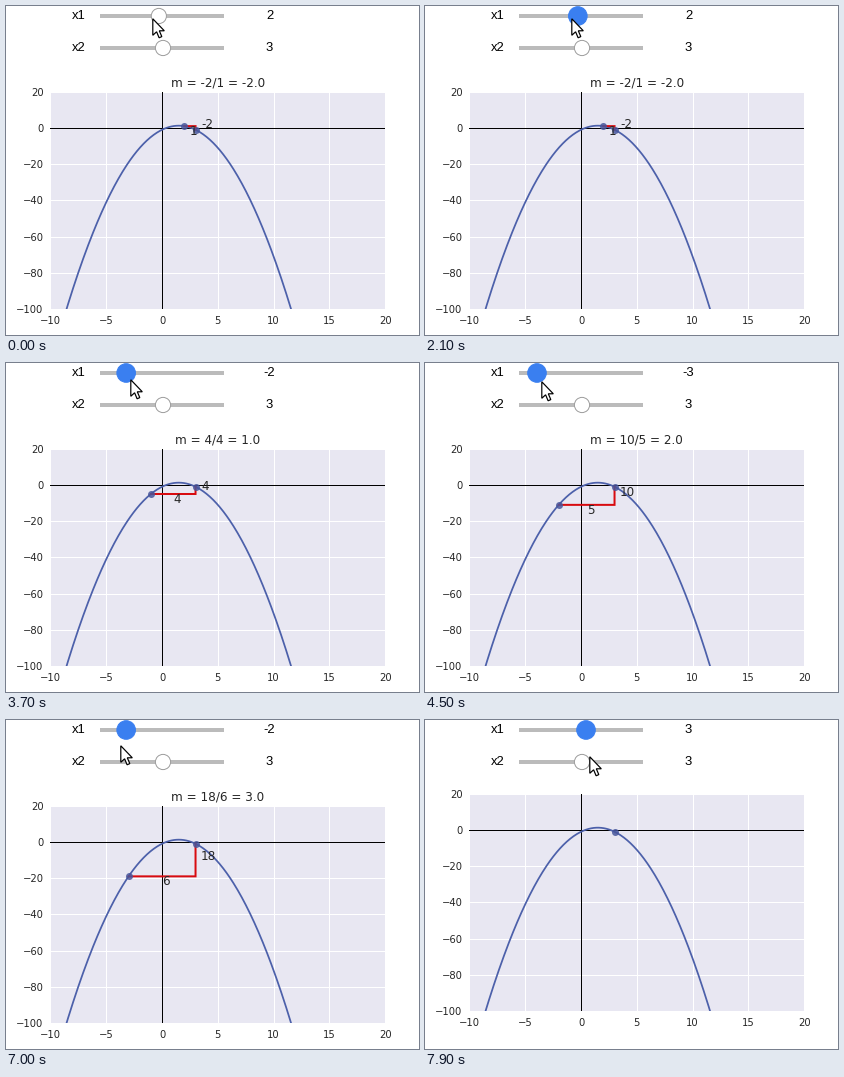
These frames come from a looping animation (413 px wide and 329 px high, 8000 ms). A matplotlib script:

```python
import numpy as np
import matplotlib.pyplot as plt
from matplotlib.animation import FuncAnimation
from matplotlib.patches import Circle, Polygon

W, H = 413, 329
TICKS = 80          # one tick is 100 ms
PRESS = 21
LAG = 2             # the graph redraws this many ticks after the slider
X2 = 3
INK = "#262626"
BLUE = "#4c60aa"
ACTIVE = "#3a7ff0"

plt.rcParams["font.family"] = "DejaVu Sans"
plt.rcParams["text.color"] = INK

# Key points: (tick, dragged value) and (tick, x, y) of the pointer tip
DRAG = [(21, 2), (23, .1), (28, -.6), (44, -2.55), (55, -3.55), (67, -3.9),
        (77, 2.6)]
POINTER = [(2, 146, 12), (4, 150, 3), (9, 121, 14), (11, 121, 14),
           (13, 146, 12), (21, 146, 12), (23, 134, 14), (31, 130, 15),
           (45, 116, 18), (58, 107, 22), (67, 107, 22), (70, 114, 25),
           (79, 164, 36)]
ARROW = np.array([(0, 0), (0, 16.5), (3.8, 13), (6.3, 19), (9, 17.8),
                  (6.5, 12), (11.5, 12)])


def f(x):
    return -x**2 + 3 * x - 1


def along(keys, tick):
    t, *tracks = zip(*keys)
    return [np.interp(tick, t, track) for track in tracks]


def slider_value(tick):
    return int(round(along(DRAG, tick)[0]))


# 72 dpi makes a point equal to a pixel
fig = plt.figure(figsize=((W + .01) / 72, (H + .01) / 72), dpi=72,
                 facecolor="white")

# Graph
ax = fig.add_axes([0, 0, 1, 1], facecolor="#e8e7f2")
ax.set(xlim=(-10, 20), ylim=(-100, 20))
ax.set_xticks(range(-10, 21, 5))
ax.set_yticks(range(-100, 21, 20))
ax.set_axisbelow(True)
ax.grid(color="white", lw=1)
ax.tick_params(length=0, pad=7, labelsize=10, labelcolor=INK)
ax.spines[:].set_visible(False)
ax.axhline(0, color="black", lw=1)
ax.axvline(0, color="black", lw=1)
xs = np.linspace(-10, 20, 400)
ax.plot(xs, f(xs), color=BLUE, lw=1.75)
legs, = ax.plot([], [], color="#d80b10", lw=2, solid_joinstyle="miter",
                snap=False)
dots = ax.scatter([], [], s=49, color="#47569c", alpha=.85, lw=0, zorder=3)
run_text = ax.text(0, 0, "", size=12)
rise_text = ax.text(0, 0, "", size=12)
title = ax.set_title("", size=12, pad=5)

# Sliders and pointer, in pixels
ui = fig.add_axes([0, 0, 1, 1], zorder=2)
ui.set(xlim=(0, W), ylim=(H, 0))
ui.axis("off")


def label(x, y, s, **kw):
    return ui.text(x, y, s, size=13, family="Liberation Sans", color="black",
                   **kw)


def slider(y, name, x, value):
    ui.plot([94, 218], [y, y], color="#bbbbbb", lw=4, solid_capstyle="butt")
    label(65.5, y + 3, name)
    text = label(263.5, y + 3, str(value), ha="center")
    knob = ui.add_patch(Circle((x, y), 7.6, fc="white", ec="#9e9e9e", lw=1,
                               zorder=3))
    return knob, text


knob, value_text = slider(10, "x1", 152.5, 2)
slider(42, "x2", 157, X2)
pointer = ui.add_patch(Polygon(ARROW, fc="white", ec="black", lw=1.2,
                               zorder=5))


def place_graph(top):
    w, h = 334.8, 217.44
    ax.set_position([44.45 / W, 1 - (top + h) / H, w / W, h / H])


def draw_slope(x1):
    y1, y2 = f(x1), f(X2)
    run, rise = X2 - x1, y2 - y1
    dots.set_offsets([(x1, y1), (X2, y2)] if run else [(X2, y2)])
    if run == 0:
        legs.set_data([], [])
        for t in (title, run_text, rise_text):
            t.set_text("")
        place_graph(73.7)
        return
    legs.set_data([x1, X2, X2], [y1, y1, y2])
    run_text.set_position(((x1 + X2) / 2, y1 - 5))
    run_text.set_text(str(run))
    rise_text.set_position((X2 + .5, (y1 + y2) / 2))
    rise_text.set_text(str(rise))
    title.set_text(f"m = {rise}/{run} = {rise / run:.1f}")
    place_graph(85.7)


def update(tick):
    value = slider_value(tick)
    pressed = tick >= PRESS
    knob.center = (136.5 + 8.17 * value, 10)
    knob.set_radius(9.3 if pressed else 7.6)
    knob.set_facecolor(ACTIVE if pressed else "white")
    knob.set_edgecolor(ACTIVE if pressed else "#9e9e9e")
    value_text.set_text(str(value))
    pointer.set_xy(ARROW + np.round(along(POINTER, tick)) + .8)
    draw_slope(slider_value(tick - LAG))
    return []


anim = FuncAnimation(fig, update, frames=TICKS, interval=100, repeat=True,
                     repeat_delay=0, init_func=lambda: update(0), blit=False)
plt.show()
```
